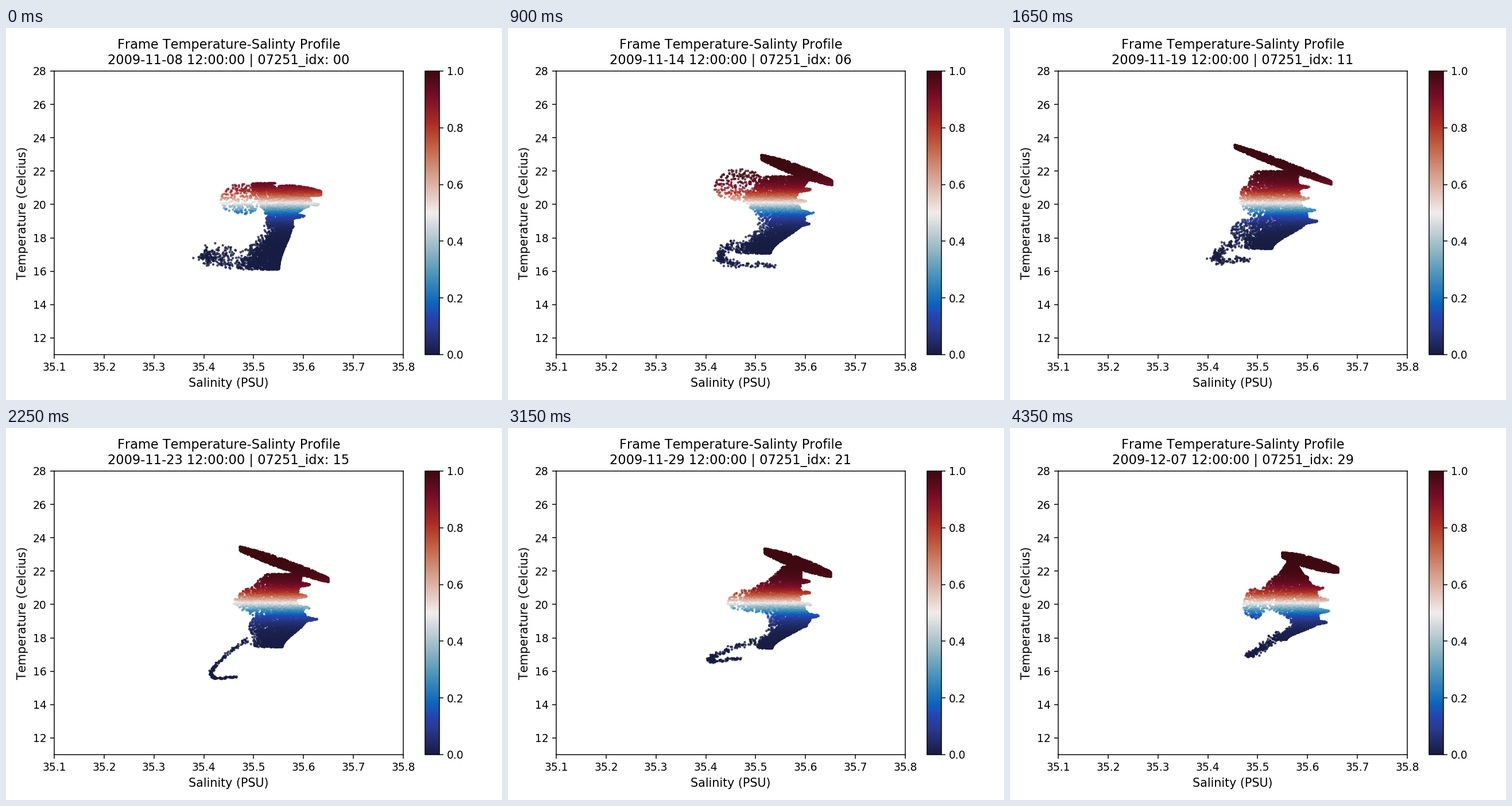
Animation of 864 by 648 pixels, one loop 4.5 s. Source, as a matplotlib script:

```python
import numpy as np
import matplotlib.pyplot as plt
from matplotlib.animation import FuncAnimation
from matplotlib.cm import ScalarMappable
from matplotlib.colors import LinearSegmentedColormap, Normalize

W, H, DPI = 864, 648, 135
LEFT, RIGHT, TOP, BOTTOM = 84, 692, 75, 569
DAYS, STEP = 30, 150

plt.rcParams.update({"font.family": "DejaVu Sans", "axes.labelsize": 11,
                     "text.kerning_factor": 6})

BALANCE = LinearSegmentedColormap.from_list("balance", [
    (0, "#171c42"), (1 / 11, "#293a8f"), (0.14, "#2247b4"), (2 / 11, "#0b66bd"),
    (3 / 11, "#4590b9"), (4 / 11, "#8eb5c2"), (5 / 11, "#d2d8db"),
    (0.5, "#f1eceb"), (6 / 11, "#e6d2cc"), (7 / 11, "#d59d89"),
    (8 / 11, "#c46548"), (9 / 11, "#ac2b24"), (10 / 11, "#780e28"),
    (1, "#3c0911")], N=256)

key_days, key_poses = [], []


def pose(day, streak, top, mid, waist, foot, lobe, tail):
    """Pixel key points.

    streak: start, end, half-width; top to foot: y, left, right of the column;
    lobe: centre, radii; tail: bend, end, half-width.
    """
    key_days.append(day)
    key_poses.append(np.array(streak + top + mid + waist + foot + lobe + tail, float))


pose(0, streak=(475, 279, 549, 288, 8),
     top=(270, 425, 460), mid=(300, 437, 532), waist=(334, 452, 500),
     foot=(421, 380, 476), lobe=(412, 298, 40, 27), tail=(348, 396, 390, 414, 14))
pose(6, streak=(441, 225, 565, 270, 10),
     top=(258, 440, 525), mid=(298, 408, 502), waist=(332, 435, 518),
     foot=(393, 378, 458), lobe=(405, 274, 47, 29), tail=(374, 404, 465, 414, 8))
pose(11, streak=(391, 206, 560, 270, 7),
     top=(249, 422, 500), mid=(296, 394, 505), waist=(333, 417, 520),
     foot=(385, 394, 457), lobe=(420, 352, 36, 20), tail=(358, 400, 416, 403, 9))
pose(15, streak=(407, 210, 562, 265, 9),
     top=(254, 447, 515), mid=(302, 392, 507), waist=(332, 430, 524),
     foot=(382, 417, 482), lobe=(445, 345, 22, 20), tail=(358, 425, 402, 433, 3))
pose(19, streak=(445, 209, 568, 253, 10),
     top=(243, 480, 516), mid=(296, 402, 510), waist=(328, 427, 526),
     foot=(379, 422, 463), lobe=(425, 283, 45, 17), tail=(337, 396, 397, 401, 5))
pose(24, streak=(449, 222, 555, 259, 11),
     top=(238, 467, 505), mid=(302, 413, 507), waist=(340, 490, 528),
     foot=(392, 432, 457), lobe=(430, 328, 48, 25), tail=(375, 410, 419, 401, 4))
pose(29, streak=(474, 221, 572, 248, 10),
     top=(230, 482, 500), mid=(299, 422, 538), waist=(338, 488, 538),
     foot=(369, 460, 482), lobe=(426, 306, 20, 27), tail=(434, 386, 414, 396, 8))

rng = np.random.default_rng(7)
band, core, halo, trail = (rng.random((n, 2)) for n in (1500, 5000, 280, 200))
scatter = rng.normal(0, 0.5, (len(trail), 2))


def smooth(t):
    t = np.clip(t, 0, 1)
    return t * t * (3 - 2 * t)


def streak_points(x0, y0, x1, y1, half):
    u, v = band.T
    width = half * np.sin(np.pi * (0.08 + 0.84 * u)) ** 0.6
    return np.column_stack([x0 + u * (x1 - x0), y0 + u * (y1 - y0) + (2 * v - 1) * width])


def column_points(rows, day):
    """Stacked layers: spikes on the right, thinning out on the lower left."""
    u, v = core.T
    y = rows[0, 0] + u * (rows[-1, 0] - rows[0, 0])
    i = np.clip(np.searchsorted(rows[:, 0], y) - 1, 0, len(rows) - 2)
    f = smooth((y - rows[i, 0]) / (rows[i + 1, 0] - rows[i, 0]))[:, None]
    left, right = (rows[i, 1:] * (1 - f) + rows[i + 1, 1:] * f).T
    spike = np.maximum(0, np.cos(2 * np.pi * (y - 288 + day) / 20)) ** 2
    right = right + 18 * spike * smooth((y - 255) / 15) * smooth((350 - y) / 15)
    skew = 0.65 - 0.3 * smooth((y - rows[2, 0]) / 20)
    return np.column_stack([left + (right - left) * v ** skew, y])


def lobe_points(cx, cy, rx, ry):
    r, a = np.sqrt(halo[:, 0]), 2 * np.pi * halo[:, 1]
    return np.column_stack([cx + rx * r * np.cos(a), cy + ry * r * np.sin(a)])


def tail_points(start, bend, end, half):
    u = trail[:, :1]
    ctrl = 2 * bend - (start + end) / 2
    path = (1 - u) ** 2 * start + 2 * u * (1 - u) * ctrl + u ** 2 * end
    return path + scatter * half * (1.2 - 0.6 * u)


def cloud(day):
    k = min(np.searchsorted(key_days, day, "right") - 1, len(key_days) - 2)
    f = (day - key_days[k]) / (key_days[k + 1] - key_days[k])
    p = key_poses[k] * (1 - f) + key_poses[k + 1] * f
    rows = p[5:17].reshape(4, 3)
    hip = (0.3 * rows[2] + 0.7 * rows[3])[[1, 0]]
    px = np.concatenate([tail_points(hip, p[21:23], p[23:25], p[25]),
                         lobe_points(*p[17:21]),
                         column_points(rows, day),
                         streak_points(*p[:5])])
    salt = 35.1 + 0.7 * (px[:, 0] - LEFT) / (RIGHT - LEFT)
    temp = 28 - 17 * (px[:, 1] - TOP) / (BOTTOM - TOP)
    return np.column_stack([salt, temp])


def box(left, right):
    return [left / W, 1 - BOTTOM / H, (right - left) / W, (BOTTOM - TOP) / H]


fig = plt.figure(figsize=(W / DPI, H / DPI), dpi=DPI, facecolor="white")
ax = fig.add_axes(box(LEFT, RIGHT))
ax.set(xlim=(35.1, 35.8), ylim=(11, 28), yticks=range(12, 29, 2),
       xlabel="Salinity (PSU)", ylabel="Temperature (Celcius)")
fig.colorbar(ScalarMappable(Normalize(0, 1), BALANCE), cax=fig.add_axes(box(730, 755)))
dots = ax.scatter([], [], s=5.2, c=[], cmap=BALANCE, vmin=0, vmax=1,
                  alpha=0.8, linewidths=0)


def update(day):
    pts = cloud(day)
    dots.set_offsets(pts)
    dots.set_array(1 / (1 + np.exp(-2.25 * (pts[:, 1] - 20.1))))
    date = 8 + day
    month, date = (11, date) if date <= 30 else (12, date - 30)
    ax.set_title("Frame Temperature-Salinty Profile\n"
                 f"2009-{month}-{date:02d} 12:00:00 | 07251_idx: {day:02d}", pad=6.5)
    return dots,


anim = FuncAnimation(fig, update, frames=DAYS, interval=STEP, repeat=True,
                     repeat_delay=0, blit=False)
plt.show()
```
